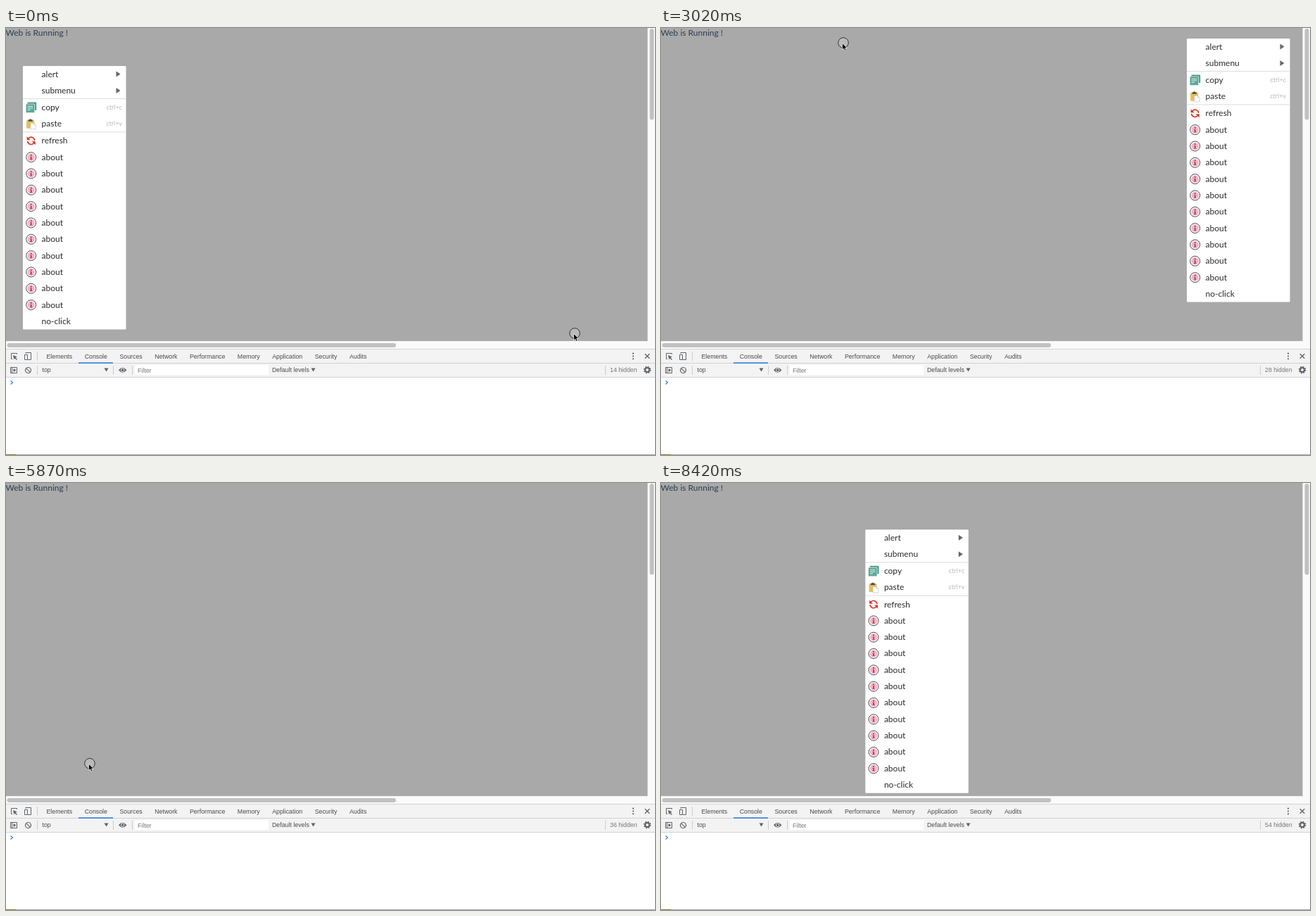
An HTML page that plays this animation: 922 by 607 pixels, repeating every 9020 ms.

```html
<!DOCTYPE html>
<html lang="en">
<head>
<meta charset="utf-8">
<title>Context menu</title>
<style>
  html, body { margin: 0; width: 100%; height: 100%; overflow: hidden; background: #fff; }
  svg { display: block; width: 922px; height: 607px; }
  .page { font: 12px Lato, "Open Sans", sans-serif; fill: #2c3e50; }
  .item { font: 12px Lato, "Open Sans", sans-serif; fill: #2b2b2b; }
  .hint { font: 9px Lato, "Open Sans", sans-serif; fill: #b9b9b9; text-anchor: end; }
  .tool { font: 8.8px "Liberation Sans", Arial, sans-serif; fill: #4a4a4a; }
  .dim { fill: #777; }
  .status { font: 9px "Liberation Sans", "Noto Sans CJK SC", "Noto Sans CJK", sans-serif; fill: #444; }
  .line { fill: none; stroke: #5f6368; }
  .solid { fill: #5f6368; }
</style>
</head>
<body>
<svg viewBox="0 0 922 607" xmlns="http://www.w3.org/2000/svg">
  <defs>
    <g id="copy">
      <path d="M-4-7.5H6.5q1 0 1 1V4H5V-5H-5.500v-1q0-1.500 1.500-1.500z" fill="#4f9a8d"/>
      <rect x="-7.500" y="-5" width="12.500" height="12.500" rx="1" fill="#5aa99a" stroke="#fff" stroke-width=".6"/>
      <path d="M-5-1.500H2.500M-5 1H2.500M-5 3.500H-1" stroke="#e4f3ef"/>
    </g>
    <g id="paste">
      <rect x="-6.500" y="-5.500" width="11" height="12" rx="1" fill="#e9bd55"/>
      <path d="M-4-6h2q1-2.500 2 0h2v2.500h-6z" fill="#4d4d4d"/>
      <path d="M-1-1H4L6.500 1.500V7.500H-1z" fill="#fff" stroke="#b5b5b5" stroke-width=".6"/>
      <path d="M4-1V1.500H6.500" fill="none" stroke="#b5b5b5" stroke-width=".6"/>
    </g>
    <g id="refresh">
      <g id="half">
        <path d="M5-.5A5 5 0 0 0-3.700-3.500" fill="none" stroke="#d9301f" stroke-width="1.600"/>
        <path d="M-6-6V-1H-1z" fill="#d9301f"/>
      </g>
      <use href="#half" transform="rotate(180)"/>
    </g>
    <g id="about">
      <circle r="7" fill="#fff" stroke="#4e4450"/>
      <circle r="5.300" fill="#f4b6c3"/>
      <circle cy="-2.700" r="1.050" fill="#a3324d"/>
      <path d="M-1.400-.7H.8V2.800H1.600V3.600H-1.600V2.800H-.8V.1H-1.400z" fill="#a3324d"/>
    </g>
  </defs>

  <rect width="922" height="607" fill="#fff"/>
  <rect width="911.700" height="445.300" fill="#a9a9a9"/>
  <text class="page" x="-.5" y="11">Web is Running !</text>

  <rect x="911.700" width="10.300" height="456" fill="#fafafa"/>
  <rect y="445.300" width="922" height="11" fill="#fafafa"/>
  <rect x="914.500" y="1" width="6" height="129.500" rx="3" fill="#c1c1c1"/>
  <rect x="1.500" y="448" width="552.500" height="6" rx="3" fill="#c1c1c1"/>

  <!-- Developer tools -->
  <rect y="456" width="922" height="40" fill="#f3f3f3"/>
  <path d="M0 456.500H922M0 476.500H922M0 496.500H922" stroke="#d2d2d2"/>
  <path d="M44.500 460V473M44.500 480V493M152.500 480V493M179.500 480V493M851.500 480V493" stroke="#ccc"/>
  <rect x="103" y="475.300" width="49" height="1.700" fill="#3b82e0"/>
  <rect x="183" y="479" width="190" height="14" fill="#fff"/>

  <path class="line" d="M9 470.500H7.500V462.500H15.500V464"/>
  <path class="solid" d="M10 465l6 2.500-2.500 1 2.500 2.500-1 1-2.500-2.500-1 2z"/>
  <path class="line" d="M28 463V461.500H35.500V471.500H31M26.500 464.500H30.500V471.500H26.500z"/>
  <path class="line" d="M6.500 482.500H15.500V490.500H6.500zM8.500 482.500V490.500"/>
  <path class="solid" d="M10.500 484l4 2.500-4 2.500z"/>
  <circle class="line" cx="31.500" cy="486.500" r="4" stroke-width="1.200"/>
  <path class="line" d="M28.700 483.700l5.600 5.600" stroke-width="1.200"/>
  <path class="solid" d="M160 486.300q5.500-7 11.500 0q-6 7-11.500 0z"/>
  <circle class="solid" cx="165.700" cy="486.300" r="2.300" stroke="#f3f3f3"/>
  <path class="solid" d="M139.500 483.500h6l-3 5zM433.500 483.500h6l-3 5z"/>
  <path class="line" d="M891 462.700v8" stroke-width="2.200" stroke-linecap="round" stroke-dasharray="0 3.800"/>
  <path class="line" d="M907.700 463.200l6.600 6.600M914.300 463.200l-6.600 6.600" stroke-width="1.300"/>
  <circle class="line" cx="911" cy="486" r="4.400" stroke-width="1.800" stroke-dasharray="1.900 1.556"/>
  <circle class="line" cx="911" cy="486" r="2.900" stroke-width="2"/>

  <text class="tool" id="tabs" x="57.500" y="469.500"></text>
  <text class="tool" x="51.500" y="489.200">top</text>
  <text class="tool dim" x="187" y="489.500">Filter</text>
  <text class="tool" x="378" y="489.200">Default levels</text>
  <text class="tool dim" id="count" x="858" y="489.200"></text>
  <path d="M6.500 501.500l3 2.500-3 2.500" fill="none" stroke="#3b82e0" stroke-width="1.300"/>
  <rect y="606" width="922" height="1" fill="#a6a6a6"/>
  <rect y="606" width="14" height="1" fill="#8f7425"/>

  <g id="status">
    <path d="M0 441.500H303q3 0 3 3V456H0z" fill="#f2f2f2" stroke="#c4c4c4" stroke-width=".6"/>
    <text class="status" x="1.500" y="452.300">正在等待 localhost 的响应...</text>
  </g>
  <g id="menu"></g>
  <g id="cursor">
    <circle cx="1.500" cy="-1.500" r="7.300" fill="#fff" fill-opacity=".2" stroke="#333"/>
    <path d="M0-1V8.500L2.200 6.500 3.700 9.800 5.500 9 4 5.800H6.900z" stroke="#fff" stroke-width=".7"/>
  </g>
</svg>
<script>
  const $ = id => document.getElementById(id);
  const LOOP = 9020, STEP = 150, MOVE = 900, RELOAD = 6920;
  const PAGE_W = 912, PAGE_H = 445, MENU_W = 146.5, MENU_H = 374.5, ROW_H = 23.33;

  $('tabs').innerHTML = 'Elements Console Sources Network Performance Memory Application Security Audits'
    .split(' ').map((name, i) => `<tspan dx="${i ? 17.5 : 0}">${name}</tspan>`).join('');

  function drawMenu() {
    const icons = ['copy', 'paste', 'refresh', 'about'];
    const labels = ['alert', 'submenu', '-', 'copy', 'paste', '-', 'refresh',
      ...Array(10).fill('about'), 'no-click'];
    let y = 11.6;
    const rows = labels.map(label => {
      if (label === '-') {
        y += .7;
        return `<path d="M0 ${y - 12.4}H${MENU_W}" stroke="#dcdcdc"/>`;
      }
      let row = `<text class="item" x="26.600" y="${y + 4}">${label}</text>`;
      if (icons.includes(label)) row += `<use href="#${label}" x="11.700" y="${y}"/>`;
      if (label === 'copy' || label === 'paste')
        row += `<text class="hint" x="141" y="${y + 3}">ctrl+${label === 'copy' ? 'c' : 'v'}</text>`;
      if (label === 'alert' || label === 'submenu')
        row += `<path d="M132.500 ${y - 4}l6 4-6 4z" fill="#666"/>`;
      y += ROW_H;
      return row;
    });
    return `<rect width="${MENU_W}" height="${MENU_H}" rx="1" fill="#fff"/>` + rows.join('');
  }
  $('menu').innerHTML = drawMenu();

  // Pointer stops; one with a hidden-message count is a right click
  const stops = [
    { at: -MOVE, x: 24, y: 54, count: 14 },
    { at: 0, x: 806.5, y: 435.5 },
    { at: 770, x: 898, y: 415, count: 20 },
    { at: 1820, x: 893.5, y: 15, count: 28 },
    { at: 2120, x: 452.5, y: 49.5 },
    { at: 3020, x: 257.5, y: 22.5 },
    { at: 3470, x: 257.5, y: 22.5, count: 30 },
    { at: 4070, x: 614.5, y: 399.5 },
    { at: 4520, x: 627.3, y: 420.3, count: 36 },
    { at: 5270, x: 222.5, y: 378.5 },
    { at: 6020, x: 91.2, y: 405.7, count: 42 },
    { at: 6470, x: 726.5, y: 198.5 },
    { at: 6620, x: 726.5, y: 198.5 },
    { at: 7220, x: 286.5, y: 199.5 },
    { at: 7370, x: 290.3, y: 440.7, count: 54 },
    { at: 7520, x: 866, y: 490 }
  ];
  const clicks = stops.filter(s => s.count);

  // The picture holds still between steps
  const tick = t => t < 140 ? 0 : t < 320 ? 140 : 320 + STEP * Math.floor((t - 320) / STEP);

  function pointer(t) {
    const i = stops.findIndex(s => s.at >= t);
    if (i < 0) return null;
    const a = stops[i - 1], b = stops[i];
    const leave = Math.max(a.at, b.at - MOVE);
    const k = Math.max(0, (t - leave) / (b.at - leave));
    return [a.x + (b.x - a.x) * k, a.y + (b.y - a.y) * k];
  }

  // The menu opens away from the page edges it would cross
  const menuPlace = ({ x, y }) =>
    [x + MENU_W > PAGE_W ? x - MENU_W : x, y + MENU_H > PAGE_H ? y - MENU_H : y];

  function place(el, pos) {
    el.style.display = pos ? '' : 'none';
    if (pos) el.setAttribute('transform', `translate(${pos})`);
  }

  function draw(now) {
    const t = tick(now % LOOP);
    const click = clicks.filter(c => c.at <= t).pop();
    const next = clicks.find(c => c.at > t);
    const reloaded = t >= RELOAD && click.at < RELOAD;
    const closed = reloaded || (next && t >= next.at - STEP);
    place($('menu'), closed ? null : menuPlace(click));
    place($('cursor'), pointer(t));
    $('count').textContent = click.count + (reloaded ? 6 : 0) + ' hidden';
    $('status').style.opacity = !reloaded ? 0 : t < RELOAD + 2 * STEP ? 1 : .35;
  }

  const start = performance.now();
  (function loop() {
    draw(performance.now() - start);
    requestAnimationFrame(loop);
  })();
</script>
</body>
</html>
```
